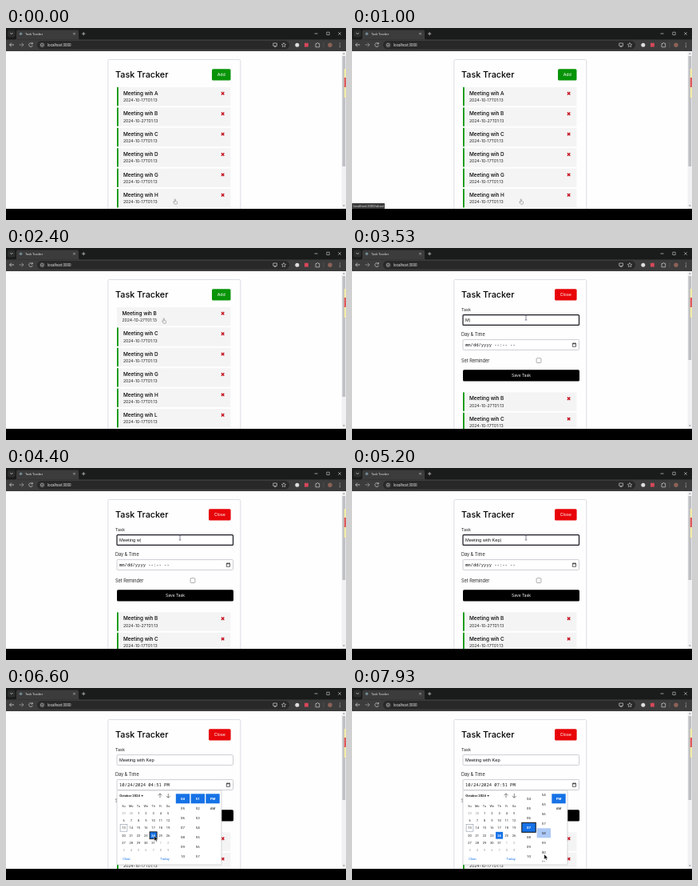
An HTML page that plays this animation: 426x240 px, repeating every 8 s.

```html
<!DOCTYPE html>
<html lang="en">
<head>
<meta charset="utf-8">
<title>Task Tracker</title>
<style>
  html, body { margin: 0; height: 100%; overflow: hidden; background: #000; }
  svg { display: block; width: 100vw; height: 100vh; }
  text { font-family: Inter, sans-serif; }
  .ui { font-family: Roboto, sans-serif; }
  .field { font-family: "Liberation Sans", sans-serif; }
  .mono { font-family: "Noto Sans Mono", monospace; }
</style>
</head>
<body>
<svg viewBox="0 0 426 240">
  <defs>
    <clipPath id="pageClip"><rect y="28" width="426" height="198"/></clipPath>
    <clipPath id="columnClip"><rect x="211" y="131" width="58" height="86"/></clipPath>
  </defs>
  <g id="page" clip-path="url(#pageClip)"></g>
  <g id="browser"></g>
  <g id="overlay"></g>
</svg>
<script>
const LOOP = 8000;
const BLUE = '#1672e6';
const GREEN = '#089408';
const TASKS = [...'ABCDGHLM'];
const ENTRY = 'Meeting with Kep';

// Moments of the interactions, in ms
const AT = {
  statusOn: 600, statusOff: 1300, remove: 1800, reminderOff: 2330, reminderOn: 2600,
  openForm: 3000, focus: 3330, type: 3480, blur: 5640, picker: 5700, day: 6450, hour: 7130,
  scroll: 7450, scrollEnd: 7930
};

// Cursor stops: time, x, y
const PATH = [
  [0, 212, 217], [1150, 212, 217], [1650, 271, 83], [1900, 271, 83], [2200, 198, 91],
  [2620, 198, 91], [2950, 268, 59], [3050, 268, 59], [3300, 218, 87], [5280, 218, 87],
  [5600, 278, 121], [5850, 278, 121], [6350, 187, 188], [6700, 187, 188],
  [7050, 221, 175], [7200, 221, 175], [7430, 242, 211], [8000, 242, 211]
];

const byId = id => document.getElementById(id);
const pad = n => String(n).padStart(2, '0');
const clamp = v => Math.min(1, Math.max(0, v));
const smooth = v => v * v * (3 - 2 * v);

const rect = (x, y, w, h, fill, extra = '') =>
  `<rect x="${x}" y="${y}" width="${w}" height="${h}" fill="${fill}" ${extra}/>`;
const line = (d, color, width = 0.8, fill = 'none') =>
  `<path d="${d}" fill="${fill}" stroke="${color}" stroke-width="${width}"/>`;
const circle = (x, y, r, fill, extra = '') =>
  `<circle cx="${x}" cy="${y}" r="${r}" fill="${fill}" ${extra}/>`;
const text = (s, x, y, size, fill = '#111', extra = '') =>
  `<text x="${x}" y="${y}" font-size="${size}" fill="${fill}" ${extra}>${s}</text>`;
const centered = (s, x, y, size, fill, extra = '') =>
  text(s, x, y, size, fill, `text-anchor="middle" ${extra}`);
const cross = (x, y, r, color, width) =>
  line(`M${x - r} ${y - r}l${2 * r} ${2 * r}m0 ${-2 * r}l${-2 * r} ${2 * r}`, color, width);

function browserChrome() {
  const ink = '#d0d0d4';
  return rect(0, 0, 426, 14.5, '#1a1b1b') +
    rect(2, 2.5, 9.5, 9, '#2c2d2d', 'rx="2.5"') + line('M5.3 6l1.6 1.7 1.6-1.7', ink) +
    line('M11 14.5q2 0 2-2V4.5q0-2 2-2H89q2 0 2 2v8q0 2 2 2z', 'none', 0, '#3c3c3c') +
    circle(18.5, 7.3, 1.8, '#718791') +
    text('Task Tracker', 24, 8.7, 3.9, '#e0e0e2', 'class="ui"') +
    cross(85.5, 7.2, 1.3, ink, 0.6) + line('M95 7.2h4.4m-2.2-2.2v4.4', ink, 0.7) +
    line('M386.5 7h4', ink, 0.7) + line('M401.8 5.2h3.4v3.4h-3.4z', ink, 0.6) +
    cross(418, 7, 1.8, ink, 0.6) +
    rect(0, 14.3, 426, 14.7, '#3c3c3c') +
    rect(39, 16, 316, 10.6, '#282828', 'rx="5.3"') +
    line('M10 21H4.5m2.3-2.4L4.5 21l2.3 2.4', ink) +
    line('M16.5 21H22m-2.3-2.4L22 21l-2.3 2.4', '#9a9a9e') +
    line('M33 19.6a2.4 2.4 0 1 0 .4 2.2M33.3 18v2h-2', ink, 0.7) +
    circle(45.3, 21.2, 3.5, '#3c3c3c') +
    circle(45.3, 21.2, 1.9, 'none', `stroke="${ink}" stroke-width=".6"`) +
    line('M45.3 20.9v1.3', ink, 0.6) +
    text('localhost:3000', 52, 22.7, 4.5, '#e8e8ea', 'class="ui"') +
    line('M334.8 19h4.6v3.4h-4.6zM336 23.6h2.4', ink, 0.7) +
    line('M348 18.4l.8 1.8 2 .2-1.5 1.3.4 2-1.7-1-1.7 1 .4-2-1.5-1.3 2-.2z', ink, 0.6) +
    circle(364.8, 21.2, 2.5, '#dedee0') +
    rect(374, 18.8, 4.8, 4.8, '#d8475a') +
    line('M388 19.5h1.5a1 1 0 0 1 2 0h1.2v4.3H388z', ink, 0.7) +
    line('M398 18v6.5', '#66676a', 0.5) +
    circle(406, 21.2, 2.7, '#8c6257') +
    [19, 21.2, 23.4].map(y => circle(418.3, y, 0.55, ink)).join('') +
    rect(0, 226, 426, 14, '#000');
}

const button = (label, x, w, color) =>
  rect(x, 51.2, w, 14.3, color, 'rx="1.6"') + centered(label, x + w / 2, 60.3, 5.3, '#fff');

function taskRow(name, y, reminder) {
  const x = reminder ? 147 : 145.5;
  const day = name === 'B' ? 27 : 17;
  return rect(139, y, 142.5, 23.4, '#f4f4f4') +
    (reminder ? rect(139, y, 1.8, 23.4, GREEN) : '') +
    text(`Meeting wih ${name}`, x, y + 9.9, 6.4, '#000', 'font-weight="500"') +
    text(`2024-10-${day}T01:13`, x, y + 18.2, 5.1, '#222') +
    cross(271.6, y + 7.8, 1.7, '#c4101c', 1.4);
}

function form(t) {
  const focused = t >= AT.focus && t < AT.blur;
  const typed = ENTRY.slice(0, Math.max(0, Math.floor((t - AT.type) / 108) + 1));
  const hour = t < AT.hour ? '04' : '07';
  const date = t < AT.day ? 'mm/dd/yyyy --:-- --' : `10/24/2024 ${hour}:51 PM`;
  const caret = focused ? '<tspan font-size="5.2" fill="#333">|</tspan>' : '';
  const outline = (color, width) => `rx="1" stroke="${color}" stroke-width="${width}"`;
  return text('Task', 137, 79.2, 5.4, '#222') +
    rect(139, 83.6, 145.5, 12.8, '#fff', focused ? outline('#15171f', 1.2) : outline('#b9bac3', 0.7)) +
    text(typed + caret, 142, 91.7, 5.7, '#111', 'class="field"') +
    text('Day &amp; Time', 137, 110.3, 5.5, '#222') +
    rect(139, 114.6, 145.5, 12.8, '#fff', outline('#b9bac3', 0.7)) +
    text(date, 142, 122.9, 5.5, '#111', 'class="mono" xml:space="preserve"') +
    line('M276.3 119.3h4.2v4h-4.2zM276.3 119.8h4.2M277.3 118.3v1m2.2-1v1', '#222', 0.7) +
    text('Set Reminder', 137, 142.6, 5.6, '#222') +
    rect(231.1, 137.7, 5.8, 5.8, '#fff', outline('#777', 0.6)) +
    rect(139, 152.2, 146, 14.3, '#000', 'rx="1.6"') +
    centered('Save Task', 212, 161.2, 5, '#fff');
}

function calendar(t) {
  const chosen = t < AT.day ? 13 : 24;
  let out = text('October 2024', 142.3, 136.1, 4.2, '#222', 'class="ui" font-weight="700"') +
    '<path d="M169.2 134h2.8l-1.4 1.7z" fill="#222"/>' +
    line('M193 137.3v-5.4m-2.4 2.4l2.4-2.4 2.4 2.4M203.3 131.9v5.4m-2.4-2.4l2.4 2.4 2.4-2.4', '#555', 0.7);
  const column = i => 147.5 + i * 9.27;
  ['Su', 'Mo', 'Tu', 'We', 'Th', 'Fr', 'Sa'].forEach((d, i) => {
    out += centered(d, column(i), 148.5, 4, '#333', 'class="ui"');
  });
  for (let i = 0; i < 42; i++) {
    const day = i - 1;
    const x = column(i % 7), y = 156.2 + Math.floor(i / 7) * 9.35;
    const inMonth = day >= 1 && day <= 31;
    const label = day < 1 ? day + 30 : day > 31 ? day - 31 : day;
    const active = day === chosen;
    if (active) {
      const ring = t < 6700 ? 'stroke="#111" stroke-width=".9"' : '';
      out += rect(x - 4.5, y - 4.4, 9, 8.8, BLUE, ring);
    } else if (day === 13) {
      out += rect(x - 4.4, y - 4.3, 8.8, 8.6, 'none', 'stroke="#8d97a8" stroke-width=".6"');
    }
    out += centered(label, x, y + 1.4, 4, active ? '#fff' : inMonth ? '#222' : '#999',
      `class="ui" ${active ? 'font-weight="700"' : ''}`);
  }
  return out + centered('Clear', 151, 214.8, 4.2, BLUE, 'class="ui"') +
    centered('Today', 199, 214.8, 4.2, BLUE, 'class="ui"');
}

function timeColumn(labels, x, selected, { offset = 0, hover = -1, ring = false } = {}) {
  return labels.map((label, i) => {
    const y = 138.3 + i * 12 - offset;
    const on = i === selected;
    const border = on && ring ? 'stroke="#111" stroke-width="1"' : '';
    const box = on || i === hover ? rect(x - 8.7, y - 6, 17.4, 12, on ? BLUE : '#adc9f5', border) : '';
    return box + centered(label, x, y + 1.6, 4.4, on ? '#fff' : '#222',
      `class="ui" ${on ? 'font-weight="700"' : ''}`);
  }).join('');
}

function picker(t) {
  const hours = Array.from({ length: 7 }, (_, i) => pad(i + 4));
  const minutes = Array.from({ length: 13 }, (_, i) => pad((i + 51) % 60));
  const offset = 41 * smooth(clamp((t - AT.scroll) / (AT.scrollEnd - AT.scroll)));
  const hourSet = t >= AT.hour;
  return rect(139, 128, 131, 93, '#fff', 'rx=".8" stroke="#c3c4ca" stroke-width=".7"') +
    calendar(t) +
    '<g clip-path="url(#columnClip)">' +
    timeColumn(hours, 221.5, hourSet ? 3 : 0, { ring: hourSet }) +
    timeColumn(minutes, 240.3, 0, { offset, hover: t > AT.scroll ? 7 : -1 }) +
    timeColumn(['PM', 'AM'], 259, 0) + '</g>';
}

function page(t) {
  const open = t >= AT.openForm;
  const removed = t >= AT.remove;
  const tasks = TASKS.slice(removed ? 1 : 0);
  const muted = t >= AT.reminderOff && t < AT.reminderOn;
  const top = open ? 180.4 : 74;
  const thumb = open ? 105 : removed ? 151 : 138;
  return rect(0, 28, 426, 198, '#fefefe') +
    rect(127.8, 39.5, 166, 300, '#fefefe', 'rx="1.5" stroke="#cdd1dc" stroke-width=".7"') +
    text('Task Tracker', 137, 62.2, 10.8, '#000', 'font-weight="500"') +
    (open ? button('Close', 254, 27.6, '#e80509') : button('Add', 258, 23.5, GREEN)) +
    (open ? form(t) : '') +
    tasks.map((name, i) => taskRow(name, top + i * 25.4, !(muted && i === 0))).join('') +
    rect(420.6, 28, 5.4, 198, '#f1f1f3') +
    line('M422 32.5l1.3-1.6 1.3 1.6zM422 221.5l1.3 1.6 1.3-1.6z', 'none', 0, '#777') +
    rect(421.4, 35, 3.8, thumb, '#bfc0c3') +
    rect(423.8, 51, 2.2, 36, '#f3eca6') + rect(423.8, 62, 2.2, 12, '#e2585e') +
    (t >= AT.picker ? picker(t) : '');
}

function cursor(t) {
  const i = Math.max(1, PATH.findIndex(stop => stop[0] > t));
  const [t0, x0, y0] = PATH[i - 1], [t1, x1, y1] = PATH[i];
  const k = smooth(clamp((t - t0) / (t1 - t0)));
  const x = x0 + (x1 - x0) * k, y = y0 + (y1 - y0) * k;
  let shape;
  if (t >= 3200 && t < 5400) {
    shape = line('M-1.3-3h2.6M0-3v6M-1.3 3h2.6', '#55506a', 0.7);
  } else if (t < 3100) {
    shape = line('M-.8-2.8q.6-.7 1.1 0v2.3l1.8.4q.7.3.5 1.1L2.1 3.1H-.8L-2.3.7q0-.8.8-.5l.7.6z', '#555', 0.45, '#fff');
  } else {
    shape = line('M-1.2-3.2v6.4l1.5-1.4 1 2.2 1.1-.5-1-2.1h2z', '#fff', 0.4, '#050505');
  }
  return `<g transform="translate(${x} ${y})">${shape}</g>`;
}

const statusBar = t => t < AT.statusOn || t >= AT.statusOff ? '' :
  rect(0, 219, 41, 7, '#3c3c3c', 'rx=".8"') +
  text('localhost:3000/about', 1.5, 223.9, 4.1, '#d5d5d8', 'class="ui"');

function draw(now) {
  const t = now % LOOP;
  byId('page').innerHTML = page(t);
  byId('overlay').innerHTML = statusBar(t) + cursor(t);
  requestAnimationFrame(draw);
}

byId('browser').innerHTML = browserChrome();
draw(performance.now());
</script>
</body>
</html>
```
